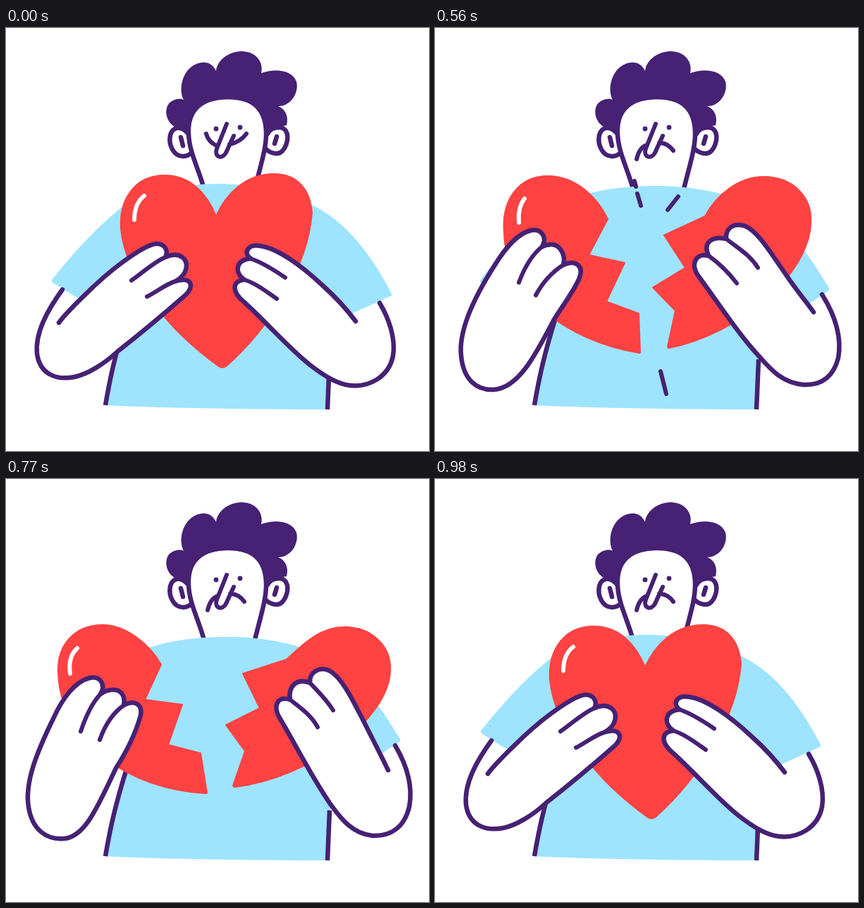
An HTML page with a canvas for the animation above (1050 ms loop, 600 by 600 pixels).

```html
<!DOCTYPE html>
<html lang="en">
<head>
<meta charset="utf-8">
<title>Broken heart</title>
<style>
html, body { margin: 0; width: 100%; height: 100%; overflow: hidden; background: #fff; }
canvas { display: block; width: 600px; height: 600px; }
</style>
</head>
<body>
<canvas id="stage" width="600" height="600"></canvas>
<script>
const ctx = document.getElementById('stage').getContext('2d');
const INK = '#462174', RED = '#ff4242', BLUE = '#9ee4ff', WHITE = '#fff';
const LOOP = 1050, LINE = 6.5;

const head = {
  hair: 'M262 178L246 143C228 138 223 118 231 107C237 101 246 99 252 102C245 88 249 66 263 55C276 46 291 46 298 61C299 47 315 33 334 33C354 33 366 48 362 64C381 57 406 59 412 76C416 92 404 111 386 111C397 115 401 126 398 138L372 143L366 178Z',
  ears: 'M260 152C249 137 236 140 233 152C230 166 238 182 251 182C256 182 260 180 263 177M371 150C376 140 392 138 397 146C403 156 396 178 384 178C377 178 372 175 369 172',
  earMarks: 'M248 155L251 167M384 154L381 164',
  face: 'M282 232C274 200 260 178 259 150C257 114 280 98 315 98C350 98 369 114 369 150C369 172 361 195 352 232',
  nose: 'M313 136L299 171C295 183 306 187 312 177L323 153',
  smile: 'M284 150C286 158 292 164 299 167M341 150C335 158 327 163 317 165',
  frown: 'M286 186C288 177 292 169 300 166M318 163C326 162 334 168 338 174'
};

const openShirt = 'M139 535C148 500 155 465 172 408L175 400L100 382L65 361Q63 359 65 357C88 325 127 285 165 256C205 234 250 224 315 224C355 224 385 230 410 236C445 247 478 268 504 293C525 313 543 343 559 369Q560 371 558 373L532 390L480 430L459 470L456 541C350 541 220 539 139 535Z';
const closedShirt = 'M139 535C148 500 155 465 172 408L175 400L100 382L66 361Q64 359 66 356C92 324 127 283 165 254C205 232 250 221 300 221C345 221 390 230 432 250C484 274 520 325 547 377Q548 379 546 380L491 405L440 420L458 490L456 541C350 541 220 539 139 535Z';

const joined = {
  shirt: closedShirt,
  hearts: 'M298 267C285 235 262 209 225 209C183 209 160 243 163 285C170 355 232 430 302 480Q307 483 312 480C374 425 428 340 434 262C431 227 412 207 380 207C340 207 312 235 298 267Z',
  shine: 'M196 238C187 245 182 256 182 272',
  arms: [
    'M80 371C59 400 41 432 44 462C48 491 71 500 97 495C116 491 140 476 158 459C190 434 228 402 252 381C270 366 262 352 241 359C259 348 259 332 250 325C243 320 233 322 226 325C231 316 225 306 214 306C200 306 160 333 125 366C103 387 85 404 75 418',
    'M530 390C543 412 553 440 549 465C543 495 515 510 488 507C470 505 452 494 430 477C400 453 372 420 338 389C322 376 318 359 338 357C324 347 325 329 347 327C336 319 343 306 360 309C385 312 420 338 450 366C470 384 484 400 496 416'
  ],
  fingers: 'M200 381C214 374 227 363 241 359M178 358C193 348 208 333 226 325M384 384C368 373 354 362 338 357M396 354C380 343 364 333 347 327'
};

const torn = {
  shirt: openShirt,
  hearts: 'M275 279C266 245 232 208 192 208C148 208 124 240 127 285C130 370 205 445 302 471L304 470L306 414L263 394L293 342L243 325ZM355 277C368 240 402 208 442 208C484 208 506 238 506 272C506 350 430 440 332 468L329 467L334 408L297 385L338 352L303 311Z',
  shine: 'M155 246C147 256 145 268 147 279',
  arms: [
    'M77 370C56 400 35 440 41 470C47 503 72 516 98 508C126 497 143 480 158 464C186 436 211 404 227 375C236 357 229 345 209 347C214 332 207 319 196 318C189 317 182 319 178 321C181 310 172 303 161 303C147 304 128 316 107 347C92 371 76 390 65 420',
    'M550 377C567 408 575 440 570 465C565 492 548 507 522 506C498 503 478 489 459 473C420 438 388 404 355 367C343 353 351 341 370 343C356 326 364 313 392 316C384 300 394 289 411 293C428 298 452 325 478 350C496 365 514 380 530 396'
  ],
  fingers: 'M167 389C180 370 193 355 209 347M139 368C148 350 160 335 178 321M410 374C397 363 384 352 370 343M430 349C415 340 403 330 392 316'
};

const apart = {
  shirt: openShirt,
  hearts: 'M245 271C230 240 200 210 160 210C118 210 94 245 98 290C100 380 190 445 290 461L291 460L289 405L243 388L269 333L218 322ZM383 267C400 235 432 211 466 211C508 211 535 240 533 275C532 350 430 435 331 454L330 452L341 401L309 368L355 340L325 294Z',
  shine: 'M127 242C119 252 118 265 119 276',
  arms: [
    'M152 310C160 296 150 284 136 287C115 292 98 315 85 336C60 375 33 425 37 464C40 500 60 514 83 513C118 511 142 465 168 415C182 392 198 372 205 354C211 338 200 328 182 336C186 320 176 307 165 307C160 307 156 308 152 310',
    'M549 378C569 410 577 440 572 468C565 495 548 507 523 506C492 503 476 484 460 466C430 434 402 390 373 351C362 334 370 319 388 323C380 305 391 295 413 299C412 283 424 276 440 281C459 289 478 322 500 353C514 374 526 387 537 403'
  ],
  fingers: 'M143 379C152 362 165 347 182 336M119 361C126 342 137 322 152 310M428 362C418 349 405 335 388 323M458 340C447 322 432 314 413 299'
};

const widest = {
  shirt: openShirt,
  hearts: 'M220 263C203 234 170 207 137 207C98 207 72 235 74 275C78 375 175 440 284 446L285 445L276 389L230 377L250 320L197 313ZM398 256C425 230 448 210 480 210C520 210 546 238 545 270C545 340 430 425 324 437L322 435L339 386L312 349L360 325L336 276Z',
  shine: 'M101 240C91 249 89 262 91 276',
  arms: [
    'M134 305C142 292 134 279 119 282C98 287 80 311 67 340C45 385 26 430 32 465C37 498 58 512 82 510C112 508 130 465 156 410C172 385 185 357 191 335C194 319 182 313 167 321C170 307 162 298 151 299C145 299 140 301 134 305',
    'M552 378C571 410 577 438 572 465C565 494 546 507 520 506C490 503 474 480 460 461C430 417 410 375 387 337C379 321 385 307 403 313C400 294 412 282 431 289C430 274 445 265 459 272C477 282 492 314 508 345C520 369 531 390 542 413'
  ],
  fingers: 'M133 370C140 350 150 333 167 321M106 358C112 340 120 320 134 305M442 352C433 335 418 325 403 313M464 328C454 312 443 302 431 289'
};

const regrip = { ...torn, shine: 'M158 243C148 252 146 264 147 277' };

// Blends two paths that share the same commands.
function mixPath(a, b, k) {
  const goal = b.match(/\d+/g);
  let i = 0;
  return a.replace(/\d+/g, n => (+n + (goal[i++] - n) * k).toFixed(2) + ' ');
}

function mixPose(a, b, k) {
  return {
    shirt: a.shirt,
    hearts: mixPath(a.hearts, b.hearts, k),
    shine: mixPath(a.shine, b.shine, k),
    arms: a.arms.map((arm, i) => mixPath(arm, b.arms[i], k)),
    fingers: mixPath(a.fingers, b.fingers, k)
  };
}

const steps = [
  { at: 0, pose: joined, happy: true },
  { at: 490, pose: torn, sparks: 'M289 240L300 286M334 251L318 280M314 464L322 498' },
  { at: 560, pose: apart, sparks: 'M283 217L285 225M287 235L292 252M345 239L330 258M320 487L328 519' },
  { at: 630, pose: mixPose(apart, widest, 0.55) },
  { at: 700, pose: mixPose(apart, widest, 0.87) },
  { at: 770, pose: widest },
  { at: 910, pose: regrip },
  { at: 980, pose: joined }
];

function fill(d, color) {
  ctx.fillStyle = color;
  ctx.fill(new Path2D(d));
}

function stroke(d, color = INK, width = LINE, cap = 'round') {
  ctx.strokeStyle = color;
  ctx.lineWidth = width;
  ctx.lineCap = cap;
  ctx.lineJoin = 'round';
  ctx.stroke(new Path2D(d));
}

function shape(d, color, edge = INK, width = LINE) {
  fill(d, color);
  stroke(d, edge, width);
}

function dot(x, y) {
  ctx.fillStyle = INK;
  ctx.beginPath();
  ctx.arc(x, y, 3.4, 0, Math.PI * 2);
  ctx.fill();
}

function drawHead(happy) {
  fill(head.hair, INK);
  shape(head.ears, WHITE);
  stroke(head.earMarks);
  shape(head.face, WHITE);
  dot(298, 143);
  dot(332, 141);
  stroke(head.nose, INK, 6);
  stroke(happy ? head.smile : head.frown, INK, 6);
}

function draw({ pose, happy, sparks }) {
  ctx.fillStyle = WHITE;
  ctx.fillRect(0, 0, 600, 600);
  drawHead(happy);
  fill(pose.shirt, BLUE);
  stroke('M141 535C147 500 154 465 172 408M456 541L459 470', INK, LINE, 'butt');
  if (sparks) stroke(sparks, INK, 6);
  shape(pose.hearts, RED, RED, 2);
  stroke(pose.shine, WHITE, 6);
  pose.arms.forEach(arm => shape(arm, WHITE));
  stroke(pose.fingers, INK, 6);
}

const start = performance.now();
let shown;

function tick() {
  const time = (performance.now() - start) % LOOP;
  const step = steps.filter(s => s.at <= time).pop();
  if (step !== shown) draw(shown = step);
  requestAnimationFrame(tick);
}
tick();
</script>
</body>
</html>
```
